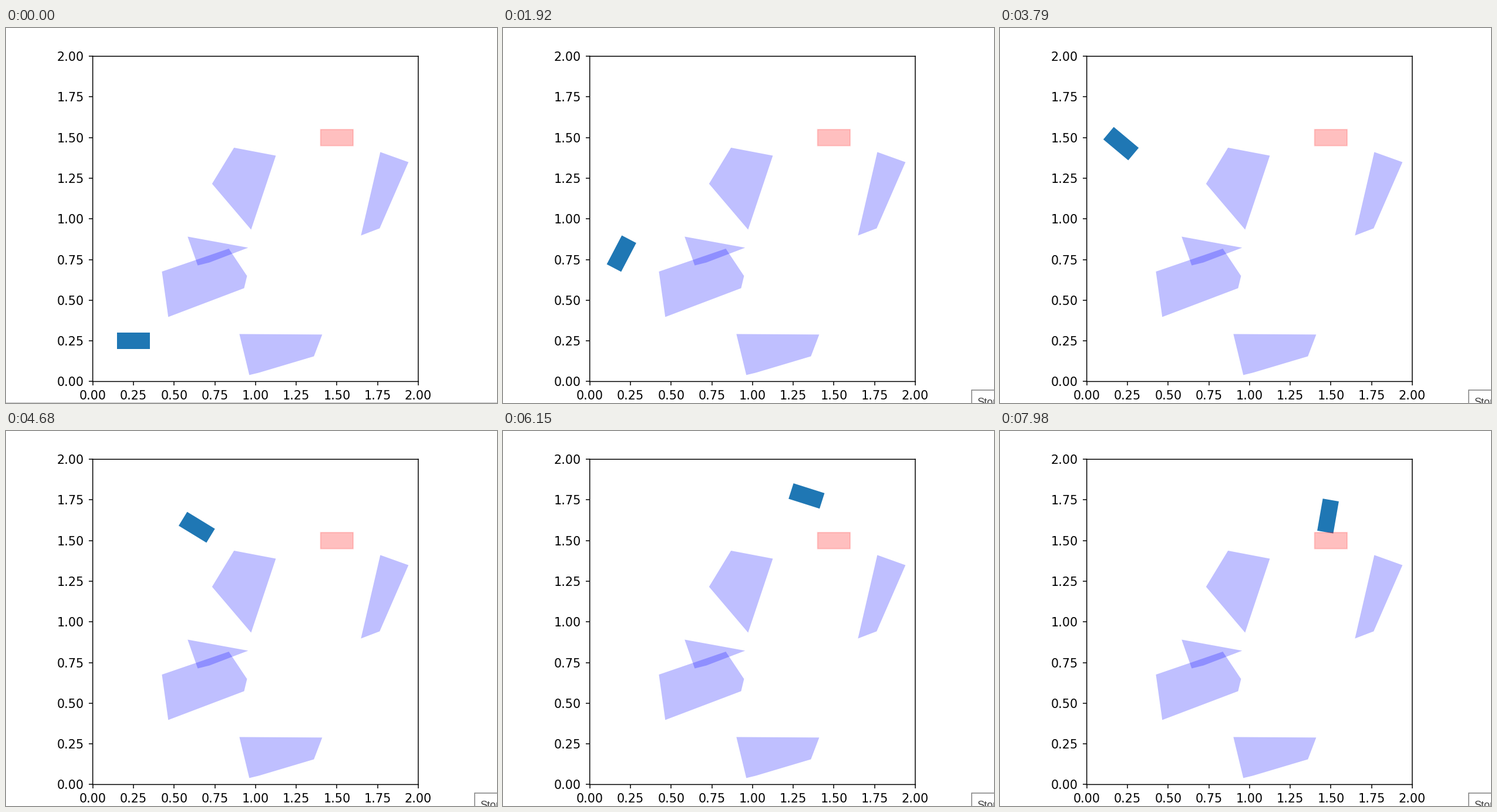
These frames come from a looping animation (836 px wide and 639 px high, 8 s). A matplotlib script:

```python
import numpy as np
import matplotlib.pyplot as plt
from matplotlib.animation import FuncAnimation
from matplotlib.patches import Polygon, Rectangle

W, H, DPI = 836, 639, 64
PT = 72 / DPI                       # points per pixel
LEFT, BASE, UNIT = 147.7, 602.4, 277.1
TICK_MS, FRAMES = 20, 400
START_MS, STEP_MS = 730, 69.05      # robot waits, then moves in even steps

OBSTACLES = [
    [(.868, 1.438), (1.125, 1.389), (.973, .934), (.733, 1.216)],
    [(1.767, 1.411), (1.940, 1.349), (1.763, .942), (1.648, .898)],
    [(.583, .891), (.955, .823), (.717, .732), (.645, .714)],
    [(.425, .676), (.836, .817), (.948, .649), (.930, .574), (.464, .397)],
    [(.901, .292), (1.410, .289), (1.359, .155), (1.020, .054), (.962, .040)],
]

# Waypoints (x, y, heading) with a short rest at the two inner ones
HOME, CORNER, ABOVE, GOAL = (
    (.25, .25, 0), (.128, 1.440, 138.4), (1.464, 1.811, 165), (1.5, 1.5, 0))
POSES = np.array([HOME, CORNER, CORNER, ABOVE, ABOVE, GOAL])
POSE_STEPS = [-2.3, 40.5, 41.5, 82, 83.4, 125.4]


def robot_corners(step):
    x, y, deg = (np.interp(step, POSE_STEPS, col) for col in POSES.T)
    a = np.radians(deg)
    box = np.array([(-.1, -.05), (.1, -.05), (.1, .05), (-.1, .05)])
    turn = np.array([(np.cos(a), np.sin(a)), (-np.sin(a), np.cos(a))])
    return box @ turn + (x, y)


fig = plt.figure(figsize=(W / DPI, H / DPI), dpi=DPI, facecolor="white")
ax = fig.add_axes([LEFT / W, (H - BASE) / H, 2 * UNIT / W, 2 * UNIT / H])
ax.set(xlim=(0, 2), ylim=(0, 2))
ticks = np.linspace(0, 2, 9)
labels = [f"{t:.2f}" for t in ticks]
ax.set_xticks(ticks, labels)
ax.set_yticks(ticks, labels)
ax.tick_params(length=7.3 * PT, width=1.5 * PT, pad=7.3 * PT,
               labelsize=20.8 * PT, labelfontfamily="DejaVu Sans")
for spine in ax.spines.values():
    spine.set(linewidth=1.5 * PT, snap=False)

for pts in OBSTACLES:
    ax.add_patch(Polygon(pts, fc="blue", ec="none", alpha=.25, zorder=1))
robot = ax.add_patch(Polygon(robot_corners(POSE_STEPS[0]), fc="#1f77b4",
                             ec="none", zorder=1.2))
ax.add_patch(Rectangle((1.4, 1.45), .2, .1, fc=(1, 0, 0, .25),
                       ec=(1, 0, 0, .16), lw=2 * PT, snap=False, zorder=1.4))

# Window edge at rest, tooltip in the corner once running
edge = fig.add_artist(Rectangle((0, 0), W, 1, transform=None,
                                fc="#bdbdbd", ec="none"))
tip = fig.add_artist(Rectangle((798, -20), 60, H - 617 + 20, transform=None,
                               fc="white", ec="#868686", lw=1.6 * PT))
tip_text = fig.text(807, H - 643, "Stop", transform=None, color="#404040",
                    family="Liberation Sans", size=18 * PT, va="baseline")


def update(i):
    t = (i + .5) * TICK_MS
    running = t >= START_MS
    step = (t - START_MS) // STEP_MS if running else POSE_STEPS[0]
    robot.set_xy(robot_corners(step))
    edge.set_visible(not running)
    tip.set_visible(running)
    tip_text.set_visible(running)
    return robot, edge, tip, tip_text


anim = FuncAnimation(fig, update, frames=FRAMES, interval=TICK_MS,
                     repeat=True, repeat_delay=0, blit=False)
plt.show()
```
